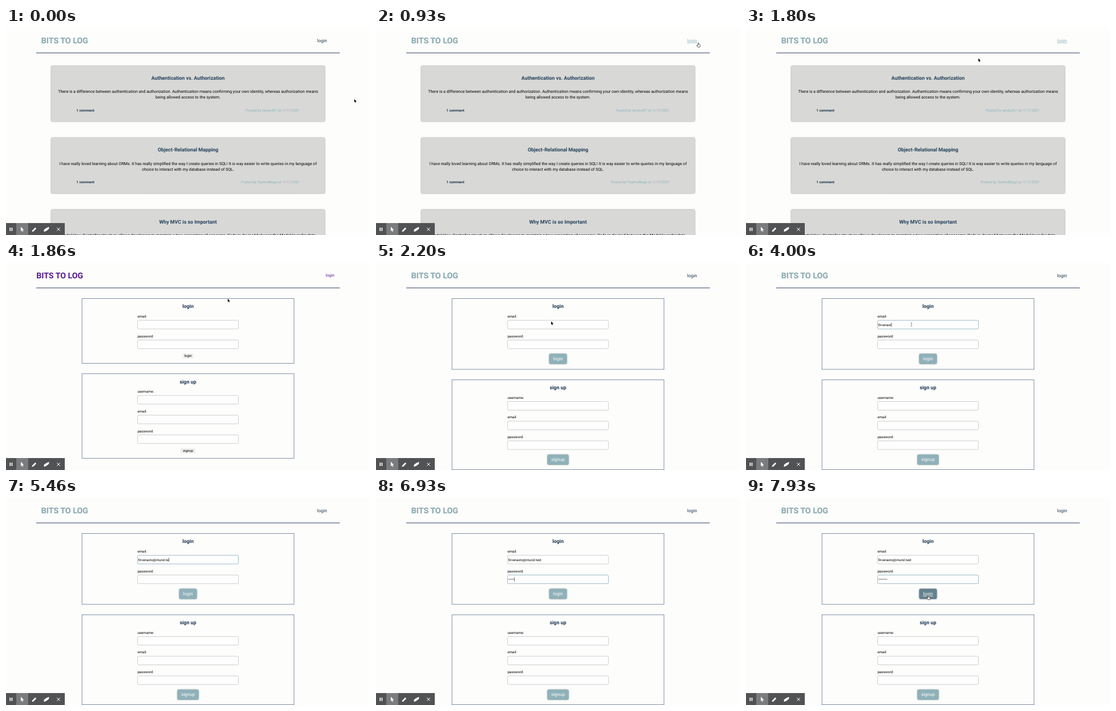
These frames come from a looping animation (638x364 px, 8 s). An HTML page:

```html
<!DOCTYPE html>
<html lang="en">
<head>
<meta charset="utf-8">
<title>Blog login</title>
<style>
  html, body { margin: 0; width: 100%; height: 100%; overflow: hidden; background: #fdfdfc; }
  svg { display: block; width: 638px; height: 364px; font-family: Roboto, sans-serif; text-rendering: geometricPrecision; }
  .card { fill: #d8d8d6; filter: drop-shadow(0 .9px .9px #0007); }
  .button { filter: drop-shadow(0 .9px .9px #0005); }
  .logo { filter: drop-shadow(.6px .6px .5px #7779); }
</style>
</head>
<body>
<svg id="stage" viewBox="0 0 638 364"></svg>
<script>
const LOOP = 8000, STEP = 200 / 3;
const NAVY = '#1b3550', TEAL = '#8fb1b9', PURPLE = '#551a8b';
const BOLD = 'font-weight="700"', MID = 'text-anchor="middle"', END = 'text-anchor="end"';
const UNDERLINE = 'text-decoration="underline"';
const INPUT_SIZE = 5.91;

const EMAIL = 'firvenasto@mund.test';
const emailKeys = [3060, 3200, 3260, 3460, 3530, 3660, 3800, 3860, 4000, 4130,
  4330, 4530, 4660, 4800, 4860, 5060, 5330, 5460, 5600, 5660];
const passwordKeys = [6260, 6400, 6530, 6660, 6930, 7060, 7200, 7400];
const FOCUS_EMAIL = 2730, FOCUS_PASSWORD = 5800;
const RAW_PAGE = 1860, STYLED_PAGE = 1930;

// time, x, y and the pointer shape from that time on
const pointerPath = [
  [0, 610.5, 125, 'arrow'], [260, 610.5, 125, 'arrow'], [530, 602, 92, 'arrow'],
  [800, 578, 45, 'arrow'], [930, 565, 26, 'hand'], [1060, 562, 20, 'hand'],
  [1250, 562, 15, 'hand'], [1400, 556, 21, 'hand'], [1600, 556, 21, 'arrow'],
  [1800, 407.3, 53.3, 'arrow'], [1860, 390.3, 62, 'arrow'], [2200, 307, 102.7, 'arrow'],
  [2260, 303, 105, 'beam'], [2400, 297, 107, 'beam'], [2530, 293, 108, 'beam'],
  [2730, 290, 108, 'beam'], [4400, 290, 108, 'none'], [7460, 290, 108, 'beam'],
  [7600, 297, 122, 'arrow'], [7730, 310, 150, 'arrow'], [7800, 316, 163, 'hand'],
  [7930, 319.3, 171, 'hand'], [LOOP, 319.3, 171, 'hand']
];

const pointerShapes = {
  arrow: '<path d="M0 0V5.7L1.3 4.5 2.2 6.6 3.1 6.2 2.2 4.2H4Z" stroke="#fff" stroke-width=".5" paint-order="stroke"/>',
  hand: '<path d="M-.7 .6Q0-.4 .7 .6V3L3 3.6Q3.6 4 3.4 5.2L2.8 7.8H-1L-2.8 4.8Q-2.6 3.9-1.6 4.5L-.7 5.2Z" fill="#fff" stroke="#222" stroke-width=".7"/>',
  beam: '<path d="M-1.3-3.2Q0-3.2 0-2.6V2.6Q0 3.2-1.3 3.2M1.3-3.2Q0-3.2 0-2.6M0 2.6Q0 3.2 1.3 3.2" fill="none" stroke="#555" stroke-width=".6"/>',
  none: ''
};

const stage = document.getElementById('stage');
const measure = document.createElement('canvas').getContext('2d');

const text = (s, x, y, size, fill, extra = '') =>
  `<text x="${x}" y="${y}" font-size="${size}" fill="${fill}" ${extra}>${s}</text>`;
const rect = (x, y, w, h, fill, extra = '') =>
  `<rect x="${x}" y="${y}" width="${w}" height="${h}" fill="${fill}" ${extra}/>`;
const countUntil = (times, t) => times.filter(k => k <= t).length;

function header(raw, hover) {
  const logo = 'BITS TO LOG';
  return rect(53, 43.1, 532, 1.35, '#64728a') + (raw
    ? text(logo, 53.2, 26.8, 14.18, PURPLE, BOLD) + text('login', 575.6, 24.4, 7.09, PURPLE, END)
    : text(logo, 61.8, 27, 14.18, TEAL, BOLD + ' class="logo"') +
      text('login', 545.3, 24.8, 8, hover ? TEAL : NAVY, hover ? UNDERLINE : ''));
}

function card(index, title, lines, author) {
  const y = 66.7 + index * 126.4;
  return rect(79.3, y, 479.4, 97.6, '#d8d8d6', 'rx="1.8" class="card"') +
    text(title, 319, y + 24.3, 8.86, '#24405a', `${BOLD} ${MID}`) +
    lines.map((line, i) => text(line, 319, y + 47.7 + i * 9.8, 7.09, '#000', MID)).join('') +
    text('1 comment', 123.3, y + 80, 6.2, NAVY, BOLD) +
    text(`Posted by ${author} on 1/17/2021`, 514.6, y + 80, 6.2, TEAL, END);
}

const home = card(0, 'Authentication vs. Authorization', [
    'There is a difference between authentication and authorization. Authentication means confirming your own identity, whereas authorization means',
    'being allowed access to the system.'], 'tandu407') +
  card(1, 'Object-Relational Mapping', [
    'I have really loved learning about ORMs. It has really simplified the way I create queries in SQL! It is way easier to write queries in my language of',
    'choice to interact with my database instead of SQL.'], 'TeaAndBugs') +
  card(2, 'Why MVC is so Important', [
    'Model View Controller structure allows developers to maintain a true separation of concerns. Code is devised between the Model layer for data'], '');

function field(label, y, value = '', focused = false, caret = false) {
  measure.font = `${INPUT_SIZE * 10}px Roboto, sans-serif`;
  const caretX = 232 + measure.measureText(value).width / 10;
  return text(label + ':', 230.4, y, 6.2, '#000') +
    rect(230.6, y + 4.7, 176.8, 15.2, '#fefefe',
      `rx="2" stroke="${focused ? '#86abb5' : '#c3c3c3'}" stroke-width=".8"`) +
    text(value, 231.8, y + 14.4, INPUT_SIZE, '#000') +
    (caret ? rect(caretX, y + 9, .6, 6.9, '#000') : '');
}

function button(label, y, halfWidth, raw, hover) {
  if (raw) {
    return rect(319 - halfWidth + 6, y, 2 * halfWidth - 12, 8.2, '#ececec', 'rx=".8"') +
      text(label, 319, y + 5.8, INPUT_SIZE, '#000', MID);
  }
  return rect(319 - halfWidth, y, 2 * halfWidth, 18.2, hover ? '#64818e' : TEAL, 'rx="3" class="button"') +
    text(label, 319, y + 11.6, 8, '#fdfdfc', `${MID} ${hover ? UNDERLINE : ''}`);
}

function panel(title, y, height) {
  return rect(133.2, y, 371.6, height, 'none', 'stroke="#70849a" stroke-width=".9"') +
    text(title, 319, y + 16.9, 8.86, NAVY, `${BOLD} ${MID}`);
}

function forms(t, raw, hover) {
  const shift = raw ? 0 : 10.6;
  const onPassword = t >= FOCUS_PASSWORD, onEmail = t >= FOCUS_EMAIL && !onPassword;
  const lastInput = Math.max(...[FOCUS_EMAIL, FOCUS_PASSWORD, ...emailKeys, ...passwordKeys].filter(k => k <= t));
  const blinkOn = (t - lastInput) % 1000 < 500;
  const email = EMAIL.slice(0, countUntil(emailKeys, t));
  const password = '•'.repeat(countUntil(passwordKeys, t));
  return panel('login', 62.4, 114 + shift) +
    field('email', 96.1, email, onEmail, onEmail && blinkOn) +
    field('password', 130.7, password, onPassword, onPassword && blinkOn) +
    button('login', 159.6, 15.6, raw, hover) +
    `<g transform="translate(0 ${shift})">` +
    panel('sign up', 194.7, 148.7 + (raw ? 0 : 9.5)) +
    field('username', 228.3) + field('email', 262.9) + field('password', 297.5) +
    button('signup', 326.2, 18.8, raw, false) + '</g>';
}

const toolbar = rect(0, 343, 103, 21, '#515254') + rect(18, 343, 21, 21, '#7b7c7e') +
  `<g fill="#fff">${rect(6.4, 351, 1.7, 6, '#fff')}${rect(9.6, 351, 1.7, 6, '#fff')}
  <path d="M26 349.6V357.4L27.8 355.8 29 358.6 30.2 358.1 29 355.3H31.4Z"/>
  <path d="M45.5 358.3 46 356 51.2 350.8 53.1 352.7 47.9 357.9Z"/>
  <path d="M66.7 354.6 71 351.4 75.6 349.8 75 353.4 70.8 356.8 66.5 358.4Z"/>
  <path d="M89.2 351.2 94.8 356.8M94.8 351.2 89.2 356.8" stroke="#fff"/></g>`;

function pointerAt(t) {
  const i = pointerPath.findLastIndex(p => p[0] <= t);
  const [t0, x0, y0, shape] = pointerPath[i];
  const [t1, x1, y1] = pointerPath[i + 1];
  const k = (t - t0) / (t1 - t0);
  return { x: x0 + (x1 - x0) * k, y: y0 + (y1 - y0) * k, shape };
}

function render(t) {
  const pointer = pointerAt(t);
  const raw = t >= RAW_PAGE && t < STYLED_PAGE;
  const navHover = t >= 930 && t < RAW_PAGE;
  const buttonHover = t > STYLED_PAGE && pointer.shape === 'hand';
  stage.innerHTML = header(raw, navHover) +
    (t < RAW_PAGE ? home : forms(t, raw, buttonHover)) + toolbar +
    `<g transform="translate(${pointer.x} ${pointer.y})">${pointerShapes[pointer.shape]}</g>`;
}

let shown = -1;
function tick() {
  const index = Math.floor((performance.now() % LOOP + 8) / STEP) % (LOOP / STEP);
  if (index !== shown) render(index * 200 / 3);
  shown = index;
  requestAnimationFrame(tick);
}
tick();
</script>
</body>
</html>
```
